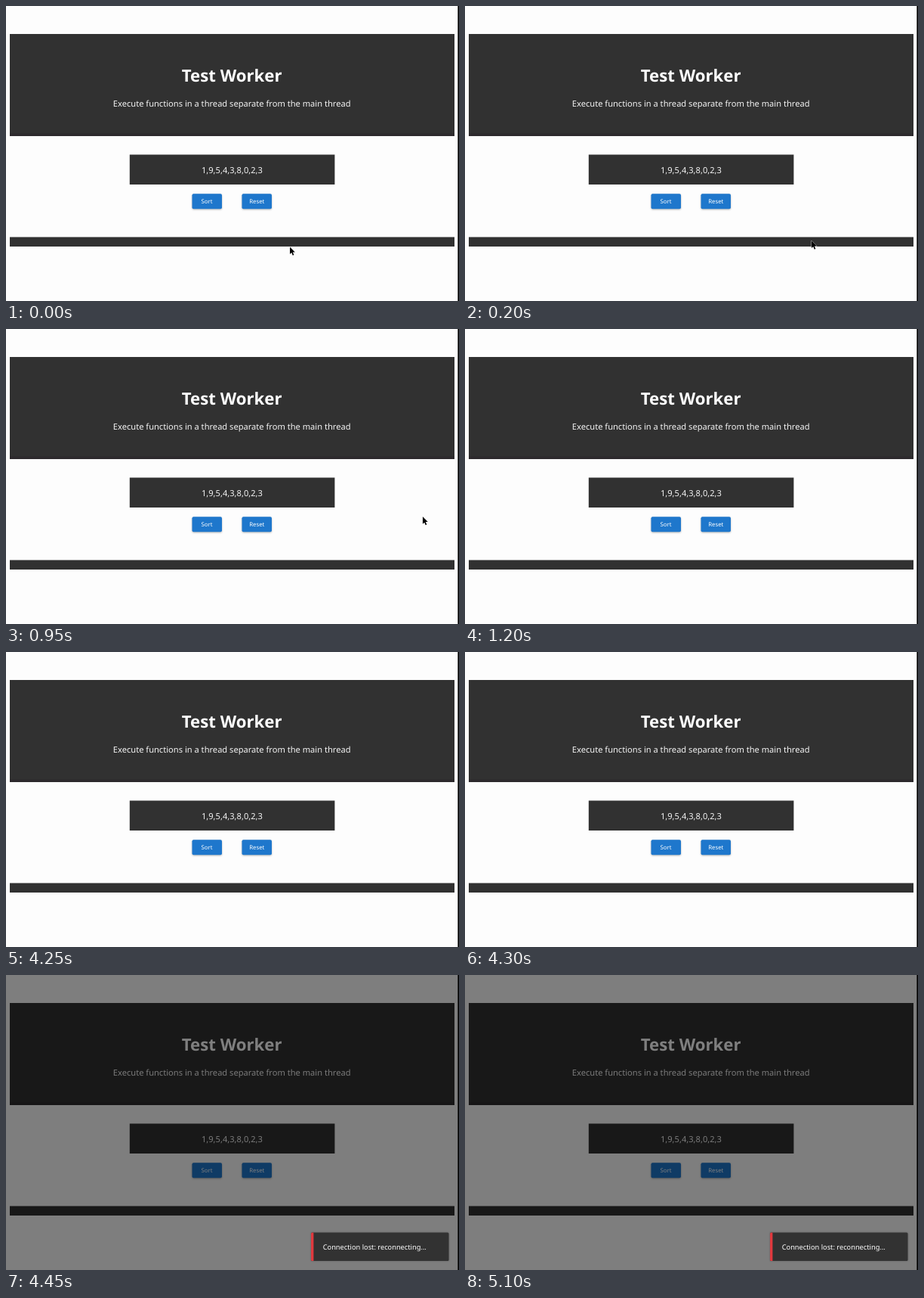
An HTML page for the animation above (8 s loop, 600 px wide and 390 px high).

```html
<!DOCTYPE html>
<html lang="en">
<head>
<meta charset="utf-8">
<title>Test Worker</title>
<style>
  html, body { margin: 0; width: 100%; height: 100%; overflow: hidden; background: #fdfdfd; }
  svg { display: block; width: 600px; height: 390px; }
  text { font-family: "Noto Sans", "Open Sans", sans-serif; fill: #fff; text-rendering: geometricPrecision; }
  .mid { text-anchor: middle; }
  .panel { fill: #313131; }
  .body { font-size: 11.11px; fill: #f4f4f4; }
  .label { font-size: 7.78px; font-weight: 500; }
  .button { fill: #1e77cc; filter: drop-shadow(0 1px 1px rgba(0, 0, 0, .28)); }
  .toast { filter: drop-shadow(0 .6px 1px rgba(0, 0, 0, .25)); }
</style>
</head>
<body>
<svg viewBox="0 0 600 390">
  <rect width="600" height="390" fill="#fdfdfd"/>
  <rect class="panel" x="5" y="37" width="589" height="135"/>
  <rect x="5" y="168.5" width="589" height="3.5" fill="#2d2a2d"/>
  <text class="mid" x="299.2" y="99.8" font-size="22.22" font-weight="700">Test Worker</text>
  <text class="mid body" x="299.2" y="133.2">Execute functions in a thread separate from the main thread</text>

  <rect class="panel" x="163.8" y="196.5" width="271.6" height="39.5"/>
  <text class="mid body" x="299.4" y="220.8">1,9,5,4,3,8,0,2,3</text>

  <rect class="button" x="246.5" y="248.3" width="39.5" height="20" rx="2"/>
  <text class="mid label" x="266" y="261.4">Sort</text>
  <rect class="button" x="312.5" y="248.3" width="39.5" height="20" rx="2"/>
  <text class="mid label" x="332.3" y="261.4">Reset</text>

  <rect class="panel" x="5" y="305.5" width="589" height="12.5"/>
  <rect x="598.4" width="1.6" height="390"/>

  <path id="cursor" d="M0 0V9.6L2.2 7.6L3.8 11.2L5.4 10.5L3.8 7H6.8Z"
        stroke="#fff" stroke-width=".7" paint-order="stroke"/>

  <g id="lost" visibility="hidden">
    <rect width="600" height="390" opacity=".5"/>
    <g class="toast">
      <rect x="404" y="340.5" width="182.5" height="37.5" rx="1.5" fill="#323232"/>
      <path d="M407.4 340.5H405.5Q404 340.5 404 342V376.5Q404 378 405.5 378H407.4Z" fill="#e0393e"/>
    </g>
    <text x="419.7" y="363" font-size="9.25">Connection lost: reconnecting...</text>
  </g>
</svg>
<script>
  const LOOP = 8000, STEP = 50, LOST_AT = 4350;
  const cursor = document.getElementById("cursor");
  const lost = document.getElementById("lost");

  // the pointer drifts in three short strokes and leaves at the right edge
  const home = { x: 376, y: 318.5 };
  const strokes = [
    { start: 0, time: 200, x: 459, y: 310.5 },
    { start: 500, time: 200, x: 536.5, y: 262 },
    { start: 900, time: 300, x: 605, y: 200 }
  ];
  const easeOut = u => 1 - (1 - u) ** 1.4;

  function pointer(t) {
    let { x, y } = home;
    for (const s of strokes) {
      const k = easeOut(Math.min(1, Math.max(0, (t - s.start) / s.time)));
      x += (s.x - x) * k;
      y += (s.y - y) * k;
    }
    return `translate(${x} ${y})`;
  }

  function draw() {
    const t = performance.now() % LOOP;
    cursor.setAttribute("transform", pointer(Math.floor(t / STEP) * STEP));
    lost.setAttribute("visibility", t >= LOST_AT ? "visible" : "hidden");
    requestAnimationFrame(draw);
  }
  draw();
</script>
</body>
</html>
```
